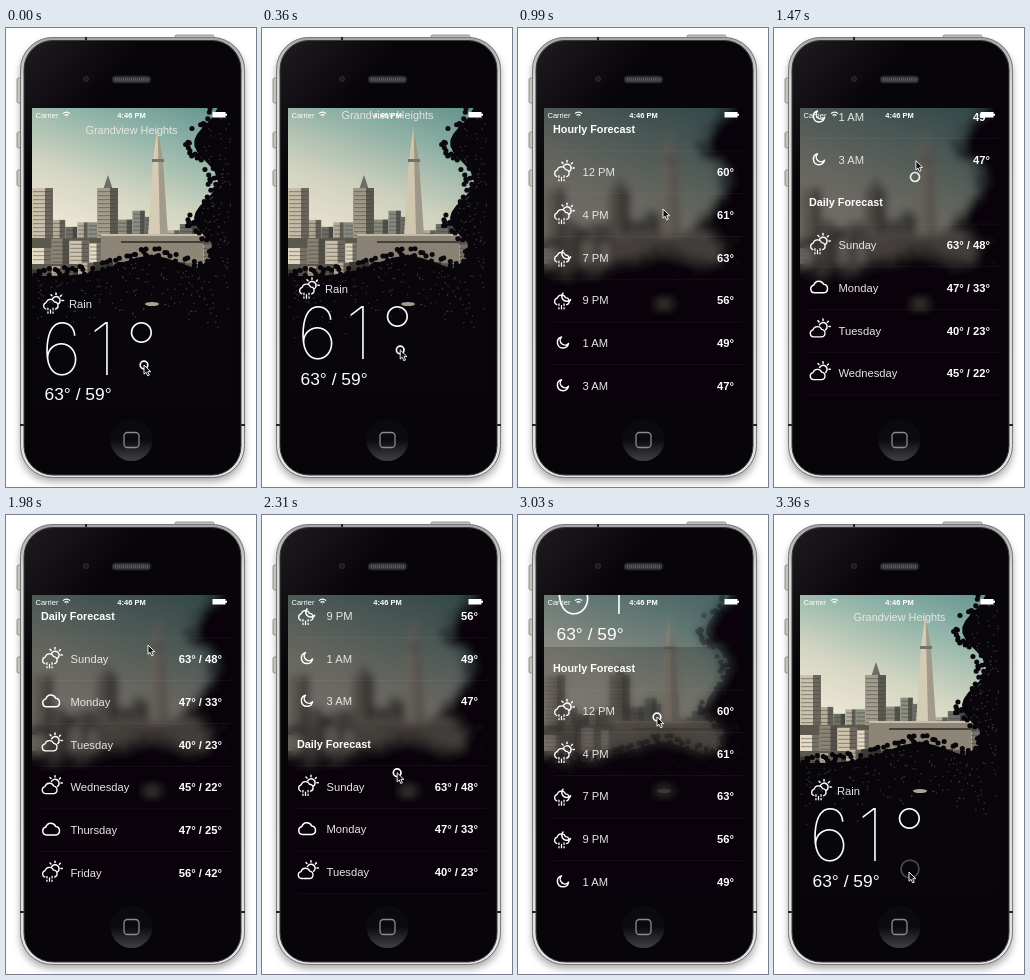
An HTML page that plays this animation: 250x459 px, repeating every 3.39 s.

```html
<!DOCTYPE html>
<html lang="en">
<head>
<meta charset="utf-8">
<title>Weather app</title>
<style>
  html, body { margin: 0; width: 100%; height: 100%; overflow: hidden; background: #fff; }
  svg { display: block; width: 250px; height: 459px; }
  text { font-family: "Liberation Sans", Arial, sans-serif; font-size: 11.2px; fill: #fff; }
  .light { fill: #e6e6e4; }
  .city { font-size: 10.9px; text-anchor: middle; }
  .range { font-size: 17.4px; }
  .bold { font-weight: 700; }
  .head { font-weight: 700; font-size: 10.8px; }
  .status { font-size: 7.5px; }
  .huge { font: 100 72px Inter, Roboto, sans-serif; }
  .end { text-anchor: end; }
  .mid { text-anchor: middle; }
  .icon { fill: none; stroke: #fff; stroke-width: 1.5; stroke-linecap: round; stroke-linejoin: round; }
  .leaf { fill: none; stroke-linecap: round; }
</style>
</head>
<body>
<svg viewBox="0 0 250 459">
  <defs>
    <linearGradient id="sky" x1=".9" y1="0" x2=".35" y2="1">
      <stop offset="0" stop-color="#568a86"/>
      <stop offset=".35" stop-color="#8fb3a8"/>
      <stop offset=".7" stop-color="#d3d6c2"/>
      <stop offset="1" stop-color="#efe7d5"/>
    </linearGradient>
    <linearGradient id="rim" x2="0" y2="1">
      <stop offset="0" stop-color="#a5a5a5"/>
      <stop offset=".1" stop-color="#d8d8d6"/>
      <stop offset="1" stop-color="#e4e4e2"/>
    </linearGradient>
    <linearGradient id="glass" x2=".6" y2="1">
      <stop offset="0" stop-color="#1f1b20"/>
      <stop offset=".25" stop-color="#08050a"/>
    </linearGradient>
    <linearGradient id="key" x2="0" y2="1">
      <stop offset=".5" stop-color="#0b0a0c"/>
      <stop offset="1" stop-color="#414042"/>
    </linearGradient>
    <filter id="soft" x="-10%" y="-10%" width="120%" height="120%"><feGaussianBlur stdDeviation="4"/></filter>
    <filter id="drop" x="-10%" y="-10%" width="120%" height="120%"><feGaussianBlur stdDeviation="3.5"/></filter>
    <clipPath id="screen"><rect x="26" y="80" width="199" height="299"/></clipPath>
  </defs>

  <rect x="14" y="14" width="225" height="440" rx="32" fill="#777" opacity=".6" filter="url(#drop)"/>
  <g fill="#c2c2c0" stroke="#77777a" stroke-width=".7">
    <rect x="169" y="7" width="39" height="5" rx="1.5"/>
    <rect x="11" y="50" width="5" height="25" rx="1.5"/>
    <rect x="11" y="104" width="5" height="16" rx="1.5"/>
    <rect x="11" y="142" width="5" height="16" rx="1.5"/>
  </g>
  <rect x="14.5" y="9.5" width="224" height="440" rx="32" fill="url(#rim)" stroke="#777"/>
  <path d="M80 9v4M14 397h4M235 397h4" stroke="#222" stroke-width="2"/>
  <rect x="18" y="12.5" width="217" height="434.5" rx="29" fill="url(#glass)" stroke="#3a3a3c"/>
  <circle cx="80" cy="51" r="2.5" fill="#1b1a20" stroke="#302f34"/>
  <rect x="106" y="48" width="39" height="7" rx="3.5" fill="#39393b" stroke="#1c1c1e"/>
  <path d="M109 51.5h33" stroke="#59595b" stroke-width="3" stroke-dasharray="1 1"/>
  <circle cx="125.500" cy="412" r="21" fill="url(#key)"/>
  <rect x="118" y="404.5" width="15" height="15" rx="3.5" fill="none" stroke="#8b8b8e" stroke-width="1.3"/>

  <g clip-path="url(#screen)">
    <g id="photo"></g>
    <g id="blurred" opacity="0">
      <use href="#photo" filter="url(#soft)"/>
      <rect x="26" y="80" width="199" height="299" fill="#0a0510" opacity=".42"/>
    </g>
    <g id="list"></g>
    <text class="status" x="29.5" y="89.7">Carrier</text>
    <path d="M57 85.600a4.800 4.800 0 0 1 7 0M58.600 87.500a2.600 2.600 0 0 1 3.800 0M60.300 89h.4" fill="none" stroke="#fff" stroke-width="1.1"/>
    <text class="status bold mid" x="125.5" y="89.7">4:46 PM</text>
    <path d="M206.500 84h13v1.800h1.500v2h-1.500v1.800h-13z" fill="#fff"/>
  </g>

  <circle id="ring" fill="none" stroke="#fff" stroke-width="1.7"/>
  <path id="arrow" d="M0 0v9.200l2.100-1.900 1.500 3.500 1.700-.7-1.500-3.400h3z" fill="#111" stroke="#fff" stroke-width=".9"/>
</svg>
<script>
const LOOP = 3390, PAGE = 299, ROW = PAGE / 7, TOP = 80;
const $ = id => document.getElementById(id);

let seed = 11;
const rnd = (a = 0, b = 1) => a + (b - a) * (seed = seed * 16807 % 2147483647) / 2147483647;
const rect = (x, y, w, h, fill) => `<rect x="${x}" y="${y}" width="${w}" height="${h}" fill="${fill}"/>`;
const path = (d, fill) => `<path d="${d}" fill="${fill}"/>`;
const text = (x, y, cls, s) => `<text x="${x}" y="${y}" class="${cls}">${s}</text>`;

// Building with a shaded right side and rows of windows
function building(x, y, w, h, fill) {
  let s = rect(x, y, w, h, fill) + rect(x + w * .62, y, w * .38, h, '#302e2c99');
  for (let v = y + 3; v < y + h - 2; v += 4) s += rect(x + 1, v, w - 2, 1.2, '#40403c70');
  return s;
}

// A row of random buildings standing on one line
function street(base, low, high, tones) {
  let s = '';
  for (let x = 26; x < 200;) {
    const w = rnd(9, 20), h = rnd(low, high);
    s += building(x, base - h, w, h, tones[Math.floor(rnd(0, tones.length))]);
    x += w;
  }
  return s;
}

// Outline of the trees: left edge of the tall one, top of the low ones
const edge = y => 194 - 12 * Math.cos((y - 115) / 12);
const crown = x => 244 - 20 * Math.exp(-(((x - 145) / 45) ** 2));

function trees() {
  const dark = '#08060b';
  let solid = 'M241 64', clumps = '', flecks = '';
  for (let y = 64; y < 230; y += 6) solid += `L${edge(y) + 6} ${y}`;
  for (let x = 190; x >= 10; x -= 6) solid += `L${x} ${crown(x) + 4}`;
  for (let i = 0; i < 1500; i++) {
    const x = rnd(26, 225), y = rnd(80, 310), depth = Math.max(x - edge(y), y - crown(x));
    const dot = `M${x.toFixed(1)} ${y.toFixed(1)}h.1`;
    if (depth > -4 && depth < 9) clumps += dot;
    else if (depth > 0 && rnd(0, 70) > depth) flecks += dot;
  }
  return path(solid + 'V394H241z', dark)
    + `<path class="leaf" d="${clumps}" stroke="${dark}" stroke-width="5"/>`
    + `<path class="leaf" d="${flecks}" stroke="#68645a" stroke-width="1.5" opacity=".5"/>`;
}

function photo() {
  return rect(10, 64, 231, 150, 'url(#sky)')
    + street(215, 10, 38, ['#8b8d80', '#b4ae9a', '#6c6f69'])
    + building(26, 160, 21, 56, '#c9c1ab')
    + path('M97 162L102 147l5 15z', '#6f6e66')
    + building(91, 160, 21, 52, '#a39c8a')
    + path('M151.500 98L147 132L142 208H162L157 132z', '#d6ccb5')
    + path('M151.500 98L154 208H162L157 132z', '#77716588')
    + path('M146 131h12v3h-12z', '#77716a')
    + rect(26, 210, 180, 40, '#5d584e')
    + street(236, 12, 26, ['#e6dcc6', '#cfc5af', '#8c8474'])
    + rect(95, 207, 102, 28, '#8d8576') + rect(95, 206, 102, 2, '#c7bda8') + rect(115, 213, 82, 2, '#443f38')
    + street(250, 8, 16, ['#b9af9a', '#5d584e', '#3b3732'])
    + trees()
    + '<ellipse cx="146" cy="276" rx="7" ry="2" fill="#aaa493"/>';
}

const CLOUD = 'M-4.500 5.500a4 4 0 0 1-.6-7.900a5.200 5.200 0 0 1 9.800-.6a4.300 4.300 0 0 1 .3 8.500z';
const SUN = '<path d="M.5-5.200a4 4 0 1 1 6.200 4.800M4-11v1.400M9.400-8.800l-1 1M11.300-3.600h-1.400M-1-9.200l1 1"/>';
const MOON = '<path d="M0-6.600a5 5 0 0 0 7.600 6.500a5 5 0 0 1-1.100 1.500"/>';
const SHOWER = 'M-5.500 3.500a4 4 0 0 1 .4-7.600a5.200 5.200 0 0 1 9.800-.6a4.200 4.200 0 0 1 1.300 8.200M-3 2.500v2M0 4.500v4M3 2.500v2M-3 7v1.500M3 7v1.500';
const sized = (k, d) => `<g transform="translate(-1.500 2) scale(${k})"><path d="${d}"/></g>`;
const ICONS = {
  rain: SUN + sized(.85, SHOWER),
  nightRain: MOON + sized(.85, SHOWER),
  moon: '<path d="M-1.500-5.500a5.600 5.600 0 1 0 7 6.500a4.600 4.600 0 0 1-7-6.500z"/>',
  cloud: `<path d="${CLOUD}"/>`,
  fair: SUN + sized(.88, CLOUD)
};
const icon = (x, y, name) => `<g class="icon" transform="translate(${x} ${y})">${ICONS[name]}</g>`;

const HOURLY = [['rain', '12 PM', '60°'], ['rain', '4 PM', '61°'], ['nightRain', '7 PM', '63°'],
  ['nightRain', '9 PM', '56°'], ['moon', '1 AM', '49°'], ['moon', '3 AM', '47°']];
const DAILY = [['rain', 'Sunday', '63° / 48°'], ['cloud', 'Monday', '47° / 33°'], ['fair', 'Tuesday', '40° / 23°'],
  ['fair', 'Wednesday', '45° / 22°'], ['cloud', 'Thursday', '47° / 25°'], ['rain', 'Friday', '56° / 42°']];

function section(page, title, rows) {
  const y0 = TOP + PAGE * page;
  let s = rect(26, y0, 199, PAGE, '#0003') + text(35, y0 + ROW / 2 + 4, 'head', title);
  rows.forEach(([name, label, temp], i) => {
    const y = y0 + ROW * (i + 1), mid = y + ROW / 2;
    s += rect(35, y, 190, .6, '#ffffff14') + icon(45, mid - .5, name)
      + text(64.5, mid + 4, 'light', label) + text(216, mid + 4, 'bold end', temp);
  });
  return s;
}

$('photo').innerHTML = photo();
$('list').innerHTML = text(125.5, 106, 'city light', 'Grandview Heights')
  + icon(46, 276, 'rain') + text(63, 280, 'light', 'Rain')
  + text('35 83.5 119', 346.5, 'huge', '61°') + text(38.5, 372, 'range', '63° / 59°')
  + section(1, 'Hourly Forecast', HOURLY) + section(2, 'Daily Forecast', DAILY);

// Each flick drags the list from one point to another, then the list snaps to a page
const FLICKS = [
  { press: 0, move: 200, release: 687, from: [138, 337], to: [140, 199], rest: [145, 181], page: 1 },
  { press: 1220, move: 1235, release: 1440, from: [147, 335], to: [141, 149], rest: [142, 130], page: 2 },
  { press: 2150, move: 2165, release: 2350, from: [142, 130], to: [131, 335], rest: [131, 335], page: 1 },
  { press: 2905, move: 2920, release: 3140, from: [140, 150], to: [136, 354], rest: [135, 357], page: 0 }
];
const SNAP = 300, FADE = 300, FOLLOW = 80, GLIDE = 190;

const part = (t, start, time) => Math.min(Math.max((t - start) / time, 0), 1);
const mix = (a, b, u) => a + (b - a) * u;
const between = (p, q, u) => [mix(p[0], q[0], u), mix(p[1], q[1], u)];
const easeOut = u => 1 - (1 - u) ** 4;
const smooth = u => u * u * (3 - 2 * u);

function pose(t) {
  const i = FLICKS.findLastIndex(f => t >= f.press), f = FLICKS[i], next = FLICKS[i + 1];
  const start = i ? FLICKS[i - 1].page * PAGE : 0;
  const finger = between(f.from, f.to, part(t, f.move, f.release - f.move) ** 2);
  const scroll = mix(start + f.from[1] - finger[1], f.page * PAGE, easeOut(part(t, f.release, SNAP)));
  let tip = between(finger, f.rest, easeOut(part(t, f.release, FOLLOW)));
  if (next) tip = between(tip, next.from, smooth(part(t, next.press - GLIDE, GLIDE)));
  return { finger, scroll, tip, fade: part(t, f.release, FADE) };
}

function draw() {
  const { finger, scroll, tip, fade } = pose(performance.now() % LOOP);
  $('list').setAttribute('transform', `translate(0 ${-scroll})`);
  $('blurred').setAttribute('opacity', Math.min(scroll / PAGE, 1));
  $('arrow').setAttribute('transform', `translate(${tip})`);
  $('ring').setAttribute('transform', `translate(${finger})`);
  $('ring').setAttribute('r', 3.8 + 7 * fade);
  $('ring').setAttribute('opacity', 1 - fade);
  requestAnimationFrame(draw);
}
draw();
</script>
</body>
</html>
```
